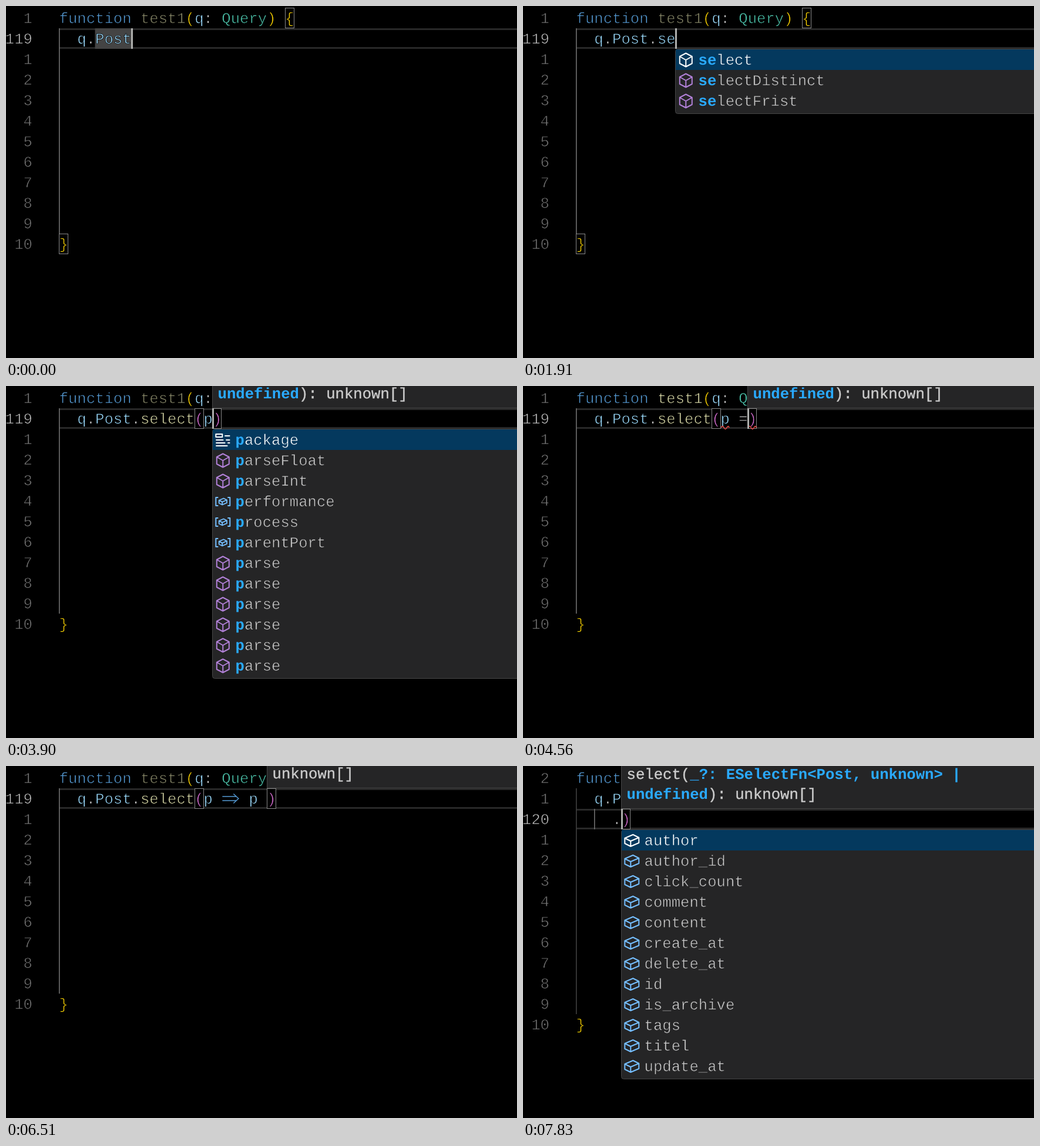
An HTML page that plays this animation: 870x600 px, repeating every 8000 ms.

```html
<!DOCTYPE html>
<html lang="en">
<head>
<meta charset="utf-8">
<title>Query autocomplete</title>
<style>
  html, body { margin: 0; width: 100%; height: 100%; overflow: hidden; background: #000; }
  svg { display: block; }
  text {
    font: 25.63px "Liberation Mono", "DejaVu Sans Mono", monospace;
    text-rendering: geometricPrecision;
    white-space: pre;
  }
  .bold { font-weight: bold; }
  /* An outline in the background colour makes the letters lighter. */
  .thin { stroke: #000; stroke-width: 0.7px; }
  .list .thin { stroke: #252526; stroke-width: 0.6px; }
  .list .chosen { stroke: #04395e; }
</style>
</head>
<body>
<svg id="stage" width="870" height="600" viewBox="0 0 870 600"></svg>
<script>
const LOOP = 8000, CHAR = 15.38, LEFT = 90.5, ROW = 35, TOP = 3;
const BLUE = '#569cd6', YELLOW = '#dcdcaa', SKY = '#9cdcfe', TEAL = '#4ec9b0',
      GOLD = '#ffd700', PINK = '#da70d6', GREY = '#cccccc', MATCH = '#2aaaff';

const SIGNATURE = 'select(_?: ESelectFn<Post, unknown> | undefined): unknown[]';
const PARAM = [7, SIGNATURE.indexOf('):')];
const WRAP_PARAM = SIGNATURE.indexOf('undefined');
const WRAP_RESULT = SIGNATURE.indexOf('unknown[]');

const BRACES = [[25, 0], [0, 11]];
const parens = col => [[15, 1], [col, 1]];

// Each item is an icon letter followed by its label.
const split = s => s.split(' ');
const METHODS = split('mgroupBy mlimit morderBy mselect mselectDistinct mselectFrist mwhere');
const SELECTS = METHODS.slice(3, 6);
const GLOBALS = split('vp kpackage mparseFloat mparseInt vperformance vprocess vparentPort mparse mparse mparse mparse mparse');
const FIELDS = split('author author_id click_count comment content create_at delete_at id is_archive tags titel update_at').map(s => 'f' + s);

const CUBE = 'M0-11.5 10.5-6V6L0 11.5-10.5 6V-6ZM-10.5-6 0 0 10.5-6M0 0V11.5';
const BRICK = 'M2-10 12-5V4L-2 10-12 5V-4ZM-12-4-2 1 12-5M-2 1V10';
const ICONS = {
  m: { color: '#b180d7', paths: [[CUBE, 1]] },
  f: { color: '#75beff', paths: [[BRICK, 1]] },
  v: { color: '#75beff', paths: [['M-8-7H-12V7H-8M8-7H12V7H8', 1], [BRICK, 0.55]] },
  k: { color: '#cccccc', paths: [['M-12-10H-1V-5H-12ZM3-7H12M-12 0H1M5 0H12M-12 5H4M8 5H12M-12 10H8', 1]] }
};

// Time and what changes then; everything else carries over.
const STEPS = [
  [0, { code: ['  q.Post'], col: 8, caret: true, mark: [4, 8], boxes: BRACES, unused: true,
        dimParam: false, waves: [], waveColor: '#f14c4c', sig: null, list: null, guide: '#707070' }],
  [260, { caret: false }],
  [720, { caret: true }],
  [1050, { code: ['  q.Post.'], col: 9, mark: null }],
  [1120, { list: { items: METHODS, typed: 0 } }],
  [1450, { unused: false, waves: [[0, 11]] }],
  [1580, { code: ['  q.Post.s'], col: 10, list: { items: SELECTS, typed: 1 } }],
  [1710, { unused: true, waves: [] }],
  [1910, { code: ['  q.Post.se'], col: 11, list: { items: SELECTS, typed: 2 } }],
  [2040, { code: ['  q.Post.sel'], col: 12, list: { items: SELECTS, typed: 3 } }],
  [2370, { code: ['  q.Post.select'], col: 15, list: null }],
  [2770, { mark: [9, 15] }],
  [2900, { code: ['  q.Post.select()'], col: 16, mark: null, boxes: parens(16) }],
  [3030, { sig: WRAP_PARAM }],
  [3430, { caret: false }],
  [3900, { code: ['  q.Post.select(p)'], col: 17, caret: true, boxes: parens(17),
           list: { items: [...GLOBALS.slice(1), 'mparse'], typed: 1 } }],
  [4030, { code: ['  q.Post.select(p )'], col: 18, boxes: parens(18), list: null }],
  [4230, { code: ['  q.Post.select(p =)'], col: 19, boxes: parens(19) }],
  [4560, { unused: false, waves: [[16, 1], [19, 1]] }],
  [4690, { caret: false }],
  [4900, { code: ['  q.Post.select(p =>)'], col: 20, caret: true, boxes: parens(20), waves: [] }],
  [5290, { dimParam: true, waves: [[20, 1]], waveColor: '#d96a50' }],
  [5360, { caret: false }],
  [5490, { code: ['  q.Post.select(p => )'], col: 21, caret: true, boxes: parens(21), waves: [[21, 1]] }],
  [5760, { code: ['  q.Post.select(p => p)'], col: 22, boxes: parens(22), list: { items: GLOBALS, typed: 1 } }],
  [5890, { code: ['  q.Post.select(p => p )'], col: 23, boxes: parens(23), list: null }],
  [5960, { sig: WRAP_RESULT }],
  [6360, { unused: true, dimParam: false, waves: [] }],
  [6510, { caret: false }],
  [6970, { code: ['  q.Post.select(p => p', '    )'], col: 4, caret: true, boxes: [[15, 1], [4, 2]] }],
  [7370, { sig: WRAP_PARAM, guide: '#404040' }],
  [7700, { code: ['  q.Post.select(p => p', '    .)'], col: 5, boxes: [[15, 1], [5, 2]] }],
  [7830, { list: { items: FIELDS, typed: 0 } }]
];

const colX = col => LEFT + col * CHAR;
const rowY = row => TOP + row * ROW;
const escape = s => s.replace(/&/g, '&amp;').replace(/</g, '&lt;');
const rect = (x, y, w, h, fill, more = '') =>
  `<rect x="${x}" y="${y}" width="${w}" height="${h}" fill="${fill}" ${more}/>`;
const text = (x, y, s, fill, more = 'class="thin"') =>
  `<text x="${x}" y="${y}" fill="${fill}" ${more}>${escape(s)}</text>`;
const path = (d, stroke, width, more = '') =>
  `<path d="${d}" fill="none" stroke="${stroke}" stroke-width="${width}" ${more}/>`;
const codeText = (col, row, s, fill, more = '') =>
  text(colX(col), rowY(row) + 26, s, fill, 'class="thin" ' + more);
const fade = on => on ? 'opacity="0.62"' : '';

function arrow(col, row) {
  const x = colX(col), y = rowY(row) + 17.5;
  return path(`M${x + 1} ${y - 3.5}h24M${x + 1} ${y + 3.5}h24M${x + 20} ${y - 8}l8.5 8-8.5 8`, BLUE, 1.4);
}

function header(s) {
  return codeText(0, 0, 'function', BLUE) + codeText(9, 0, 'test1', YELLOW, fade(s.unused)) +
    codeText(14, 0, '(', GOLD) + codeText(15, 0, 'q', SKY) + codeText(16, 0, ':', GREY) +
    codeText(18, 0, 'Query', TEAL) + codeText(23, 0, ')', GOLD) + codeText(25, 0, '{', GOLD);
}

function codeLine(line, row, s) {
  let out = '';
  for (const { 0: token, index: col } of line.matchAll(/=>|\w+|\S/g)) {
    if (token === '=>') { out += arrow(col, row); continue; }
    const color = token === 'select' ? YELLOW : /\w/.test(token) ? SKY : /[()]/.test(token) ? PINK : GREY;
    out += codeText(col, row, token, color, fade(s.dimParam && token === 'p' && col === 16));
  }
  return out;
}

function lineNumbers(current) {
  let out = '';
  for (let row = 0; row <= 10 + current; row++) {
    const active = row === current;
    out += text(45, rowY(row) + 26, String(active ? 118 + row : Math.abs(row - current)),
      active ? '#c6c6c6' : '#757575', 'class="thin" text-anchor="end"');
  }
  return out;
}

function wave([col, row], color) {
  return path(`M${colX(col) + 0.5} ${rowY(row) + 33}q2.5-5 5 0t5 0t4 0`, color, 1.6);
}

function signature(s, row) {
  const x = Math.floor(colX(s.col)), bottom = rowY(row);
  let out = rect(x + 0.5, -5.5, 900, bottom + 5, '#252526', 'stroke="#454545"');
  const piece = (lineStart, from, to, y, active) => from >= to ? '' :
    text(x + 9.6 + (from - lineStart) * CHAR, y, SIGNATURE.slice(from, to), active ? MATCH : GREY,
      active ? 'class="bold"' : `stroke="${GREY}" stroke-width="0.4"`);
  [[0, s.sig, bottom - 51], [s.sig, SIGNATURE.length, bottom - 17]].forEach(([from, to, y]) => {
    const clamp = n => Math.min(to, Math.max(from, n));
    const a = clamp(PARAM[0]), b = clamp(PARAM[1]);
    out += piece(from, from, a, y) + piece(from, a, b, y, true) + piece(from, b, to, y);
  });
  return out;
}

function suggestions({ items, typed }, col, row) {
  const x = Math.floor(colX(col)), y = rowY(row + 1);
  let out = rect(x + 0.5, y + 0.5, 900, items.length * ROW + 5, '#252526', 'stroke="#454545" rx="4"') +
    rect(x + 1, y + 1, 900, ROW, '#04395e');
  items.forEach((item, i) => {
    const icon = ICONS[item[0]], label = item.slice(1), base = y + 27 + i * ROW;
    const color = i ? icon.color : '#ffffff';
    icon.paths.forEach(([d, scale]) => {
      out += path(d, color, 2 / scale ** 0.9,
        `stroke-linejoin="round" transform="translate(${x + 18.3} ${base - 8}) scale(${scale})"`);
    });
    if (typed) out += text(x + 39.5, base, label.slice(0, typed), MATCH, 'class="bold"');
    out += text(x + 39.5 + typed * CHAR, base, label.slice(typed), i ? GREY : '#ffffff',
      `class="thin${i ? '' : ' chosen'}"`);
  });
  return `<g class="list">${out}</g>`;
}

function picture(s) {
  const row = s.code.length, y = rowY(row), end = 10 + row;
  let out = rect(0, 0, 870, 600, '#000') +
    rect(91, y, 900, 3, '#282828') + rect(91, y + 32, 900, 3, '#282828') +
    rect(90, rowY(1), 1.6, rowY(end) - rowY(1), s.guide);
  if (row === 2) out += rect(121, y, 1.6, ROW, '#707070');
  if (s.mark) out += rect(colX(s.mark[0]) - 0.5, y, (s.mark[1] - s.mark[0]) * CHAR, ROW, '#444444');
  for (const [c, r] of s.boxes) {
    out += rect(Math.floor(colX(c)) + 0.5, rowY(r) + 0.5, 15, 34, '#000', 'stroke="#888888"');
  }
  out += lineNumbers(row) + header(s) + s.code.map((line, i) => codeLine(line, i + 1, s)).join('') +
    codeText(0, end, '}', GOLD) + s.waves.map(w => wave(w, s.waveColor)).join('');
  if (s.caret) out += rect(Math.floor(colX(s.col)), y, 3, ROW, '#aeafad');
  if (s.sig) out += signature(s, row);
  if (s.list) out += suggestions(s.list, s.col, row);
  return out;
}

const stage = document.getElementById('stage');
const start = performance.now();
let shown = -1;

function draw() {
  const time = (performance.now() - start) % LOOP;
  const count = STEPS.filter(([at]) => at <= time).length;
  if (count !== shown) {
    shown = count;
    stage.innerHTML = picture(Object.assign({}, ...STEPS.slice(0, count).map(step => step[1])));
  }
  requestAnimationFrame(draw);
}
draw();
</script>
</body>
</html>
```
